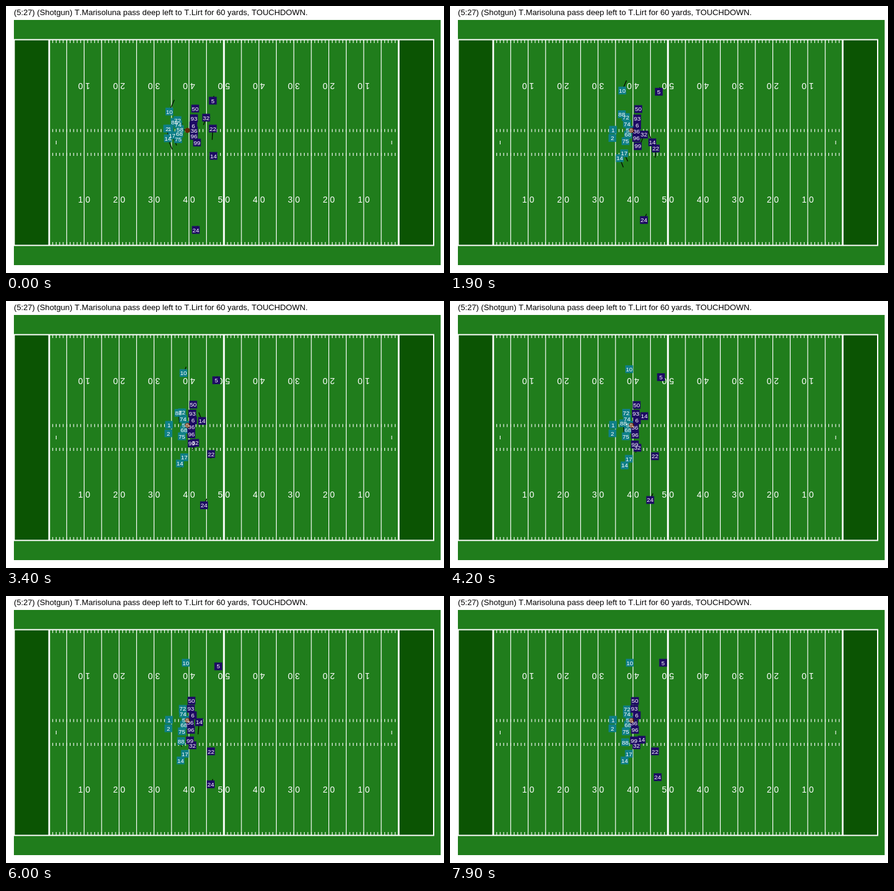
Write an HTML page with a canvas that moves like this. It is 720 px wide and 440 px high and loops after 8000 ms.

```html
<!DOCTYPE html>
<html lang="en">
<head>
<meta charset="utf-8">
<title>Play animation</title>
<style>
html, body { margin: 0; width: 720px; height: 440px; overflow: hidden; background: #fff; }
canvas { display: block; }
</style>
</head>
<body>
<canvas id="stage" width="720" height="440"></canvas>
<script>
const ctx = document.getElementById('stage').getContext('2d');
const FONT = '"Liberation Sans", Arial, sans-serif';
const LOOP = 8000, STEP = 100;
const TEAL = '#0f7f88', NAVY = '#1d0a64';
const yardX = y => 71 + 5.745 * y;

// A run starts at (x, y); each leg is [seconds, x, y, launch].
// launch is the starting speed relative to the average: 0 = from rest.
const players = [];
const add = (color, number, x, y, ...legs) => players.push({ color, number, x, y, legs });

add(TEAL, 10, 268.5, 174, [5, 295.5, 110]);
add(TEAL, 88, 277, 191, [2.6, 283, 177], [3.8, 288, 241, 0]);
add(TEAL, 72, 282, 188, [2, 289, 183], [6, 291, 187, 0]);
add(TEAL, 74, 283, 195, [1.6, 291, 194]);
add(TEAL, 58, 286, 203, [1.3, 295, 204]);
add(TEAL, 68, 285, 210, [2, 292.5, 212]);
add(TEAL, 75, 283, 219.5, [2.5, 289, 223]);
add(TEAL, 17, 273, 213, [4.2, 294, 260]);
add(TEAL, 14, 266, 218, [4.3, 287, 271]);
add(TEAL, 2, 265, 202, [2.2, 267, 218]);
add(TEAL, 1, 269, 202, [1.2, 268, 204]);
add(NAVY, 5, 340, 156, [9, 350.5, 109]);
add(NAVY, 50, 311, 169, [8, 304, 173, 0.5]);
add(NAVY, 93, 309, 185, [8, 303, 186, 0.5]);
add(NAVY, 32, 329, 184, [5.2, 306.5, 246, 1]);
add(NAVY, 6, 308, 197, [8, 307, 196.5]);
add(NAVY, 36, 309, 205, [7, 302.5, 209]);
add(NAVY, 96, 309, 214, [5, 304, 220.5]);
add(NAVY, 99, 314, 225, [6, 302.5, 238]);
add(NAVY, 22, 340, 202, [4.4, 337, 256]);
add(NAVY, 14, 341, 247, [4.5, 319, 189, 0], [3.5, 315, 237, 0]);
add(NAVY, 24, 312, 369, [8.8, 342, 297, 0.8]);

// Position and velocity at time t; every leg slows to a stop
function pose({ color, number, x, y, legs }, t) {
  let vx = 0, vy = 0;
  for (const [time, toX, toY, k = 1.5] of legs) {
    if (t < 0) break;
    const u = Math.min(t / time, 1), dx = toX - x, dy = toY - y;
    const part = u * (k + u * (3 - 2 * k + u * (k - 2)));
    const speed = (k + u * (2 * (3 - 2 * k) + 3 * u * (k - 2))) / time;
    x += dx * part;
    y += dy * part;
    vx = dx * speed;
    vy = dy * speed;
    t -= time;
  }
  return { color, number, x, y, vx, vy };
}

function rect(color, x, y, w, h) {
  ctx.fillStyle = color;
  ctx.fillRect(x, y, w, h);
}

function line(color, width, x1, y1, x2, y2) {
  ctx.strokeStyle = color;
  ctx.lineWidth = width;
  ctx.beginPath();
  ctx.moveTo(x1, y1);
  ctx.lineTo(x2, y2);
  ctx.stroke();
}

function label(text, x, y, size, color = '#fff', align = 'center') {
  ctx.font = `${size}px ${FONT}`;
  ctx.fontKerning = 'none';
  ctx.fillStyle = color;
  ctx.textAlign = align;
  ctx.fillText(text, x, y);
}

function drawField() {
  rect('#fff', 0, 0, 720, 440);
  label('(5:27) (Shotgun) T.Marisoluna pass deep left to T.Lirt for 60 yards, TOUCHDOWN.', 13, 15, 13.2, '#000', 'left');
  rect('#207d1c', 13, 23, 701.5, 404);
  for (const x of [13.5, 645.5]) rect('#0b5403', x, 55.5, 57.5, 339);

  for (let y = 5; y < 100; y += 5) line('#fff', y === 50 ? 3 : 1.2, yardX(y), 56, yardX(y), 394);
  for (let y = 1; y < 100; y++) {
    for (const top of [56, 202.7, 242, 389]) line('#fff', 1.1, yardX(y), top, yardX(y), top + 5);
  }
  for (const y of [2, 98]) line('#fff', 1.1, yardX(y), 222, yardX(y), 228);
  for (const y of [0, 100]) line('#fff', 2.8, yardX(y), 56, yardX(y), 394);
  ctx.strokeStyle = '#fff';
  ctx.lineWidth = 2;
  ctx.strokeRect(13.5, 55.5, 689.5, 339);

  for (let y = 10; y < 100; y += 10) {
    const text = `${Math.min(y, 100 - y) / 10} 0`;
    label(text, yardX(y), 323.7, 14.23);
    ctx.save();
    ctx.translate(yardX(y), 127);
    ctx.rotate(Math.PI);
    label(text, 0, 0, 14.23);
    ctx.restore();
  }
}

function drawPlayers(t) {
  const poses = players.map(p => pose(p, t));
  // Each heading line reaches where the player would be a second later
  for (const p of poses) line('#000', 1.2, p.x, p.y, p.x + p.vx, p.y + p.vy);
  for (const p of poses) rect(p.color, p.x - 6.4, p.y - 6.4, 12.8, 12.8);
  ctx.fillStyle = '#642806';
  ctx.beginPath();
  ctx.arc(298.3, 205, 4.2, 0, 2 * Math.PI);
  ctx.fill();
  for (const p of poses) label(p.number, p.x, p.y + 3.5, 9.96);
}

function frame() {
  const t = Math.floor(performance.now() % LOOP / STEP) * STEP / 1000;
  drawField();
  drawPlayers(t);
  requestAnimationFrame(frame);
}
frame();
</script>
</body>
</html>
```
